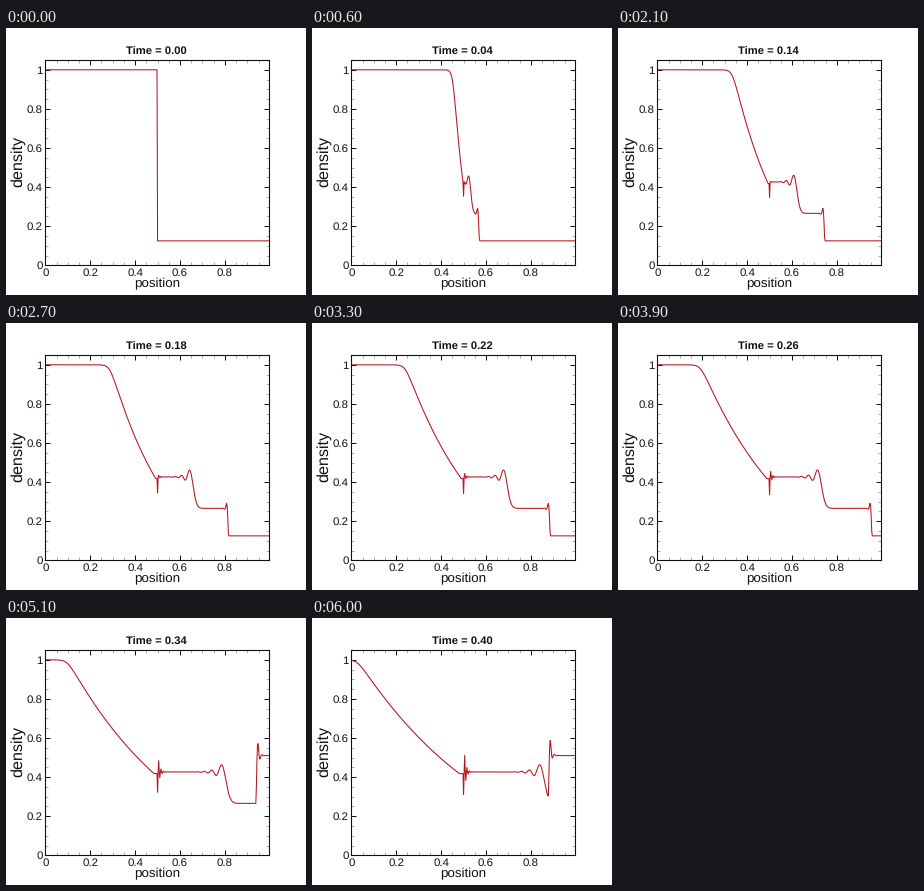
These frames come from a looping animation (300x267 px, 6.3 s). A matplotlib script:

```python
import matplotlib.pyplot as plt
import numpy as np
from matplotlib.animation import FuncAnimation
from matplotlib.ticker import FuncFormatter, MultipleLocator

W, H, DPI = 300, 267, 100
LEFT, RIGHT, TOP, BOTTOM = 39.3, 263.3, 32, 237.3
FRAMES, STEP_MS, DT = 21, 300, 0.02
INK, GREY, RED = "#111111", "#8c8c8c", "#b5161e"

plt.rcParams["font.family"] = "Liberation Sans"
plt.rcParams["text.hinting"] = "none"

# Shock tube states and wave speeds
C_LEFT, V_CONTACT, V_SHOCK, V_REFLECT = 1.1832, 0.9275, 1.7522, 1.008
RHO_R, RHO_SHOCK, RHO_CONTACT, RHO_REFLECT = 0.125, 0.2656, 0.4263, 0.51
T_WALL = 0.5 / V_SHOCK

x = np.arange(400) / 400
K = np.arange(0.01, 6, 0.02)


def px(points):
    return points * 72 / DPI


def airy_step(z, damping):
    """Step from 1 to 0 with a damped Airy wave train on its left."""
    z = np.clip(z, -25, 15)
    wave = np.sin(np.outer(z, K) + K**3 / 3) * np.exp(-damping * K**4) / K
    return 0.5 - wave.sum(axis=1) * 0.02 / np.pi


def shock_step(depth, overshoot):
    """Step from 0 to 1 that rings behind the front like a damped oscillator."""
    u = np.maximum(depth, 0) * np.pi / 0.009
    d = -np.log(overshoot) / np.pi
    return 1 - np.exp(-d * u) * (np.cos(u) + d * np.sin(u))


def fan(t):
    head = 0.5 - C_LEFT * t
    w = 0.018 * np.cbrt(t)
    drop = w * np.logaddexp(0, (x - head) / w) / (6 * C_LEFT * t)
    return np.maximum(1 - drop, 0) ** 5


def spike(t):
    """Grid-scale ringing at the diaphragm, growing with time."""
    grow = 0.085 * (max(t - 0.1, 0) / 0.3) ** 1.7
    d = x - 0.5
    ring = -grow * np.cos(np.pi * d / 0.005) * np.exp(-(d - 0.005) / 0.0075)
    ring[d < 0.004] = 0
    ring[200] = -(0.078 + 0.45 * grow)
    return ring


def density(t):
    if t == 0:
        return np.where(x < 0.4985, 1, RHO_R)
    s = 0.019 * np.cbrt(t)
    contact = airy_step((x - 0.5 - V_CONTACT * t) / s, 0.0215 / np.cbrt(t))
    right = (RHO_CONTACT - RHO_SHOCK) * contact
    if t < T_WALL:
        foot = 0.501 + V_SHOCK * t
        right += RHO_R + (RHO_SHOCK - RHO_R) * shock_step(foot - x, 0.18)
    else:
        foot = 0.9925 - V_REFLECT * (t - T_WALL)
        right += RHO_SHOCK + (RHO_REFLECT - RHO_SHOCK) * shock_step(x - foot, 0.27)
    left = np.maximum(fan(t), 0.418)
    return np.where(x < 0.499, left, right) + spike(t)


fig = plt.figure(figsize=(W / DPI, H / DPI), dpi=DPI, facecolor="white")
ax = fig.add_axes([LEFT / W, 1 - BOTTOM / H, (RIGHT - LEFT) / W, (BOTTOM - TOP) / H])
ax.set(xlim=(0, 0.9975), ylim=(0, 1.05))
for axis in (ax.xaxis, ax.yaxis):
    axis.set_major_locator(MultipleLocator(0.2))
    axis.set_minor_locator(MultipleLocator(0.05))
    axis.set_major_formatter(FuncFormatter(lambda v, _: f"{v:.1g}"))
ax.tick_params(which="both", direction="in", top=True, right=True)
ax.tick_params(which="major", length=px(5), width=px(1), color=INK,
               labelsize=px(11.5), labelcolor=INK, pad=px(2.5))
ax.tick_params(which="minor", length=px(3), width=px(0.7), color=GREY)
for side in ax.spines.values():
    side.set(linewidth=px(1.1), color=INK)


def label(cx, cy, text, size, **kw):
    return fig.text(cx / W, 1 - cy / H, text, fontsize=px(size), color=INK,
                    ha="center", va="baseline", rotation_mode="anchor", **kw)


label(151, 259, "position", 13.4)
label(16, 133.8, "density", 16.1, rotation=90)
title = label(150.5, 27, "", 11.25, weight="bold")
line, = ax.plot([], [], color=RED, lw=px(1.05), solid_joinstyle="round")


def update(i):
    t = i * DT
    line.set_data(x, density(t))
    title.set_text(f"Time = {t:.2f}")
    return line, title


anim = FuncAnimation(fig, update, frames=FRAMES, interval=STEP_MS,
                     repeat=True, repeat_delay=0)
plt.show()
```
